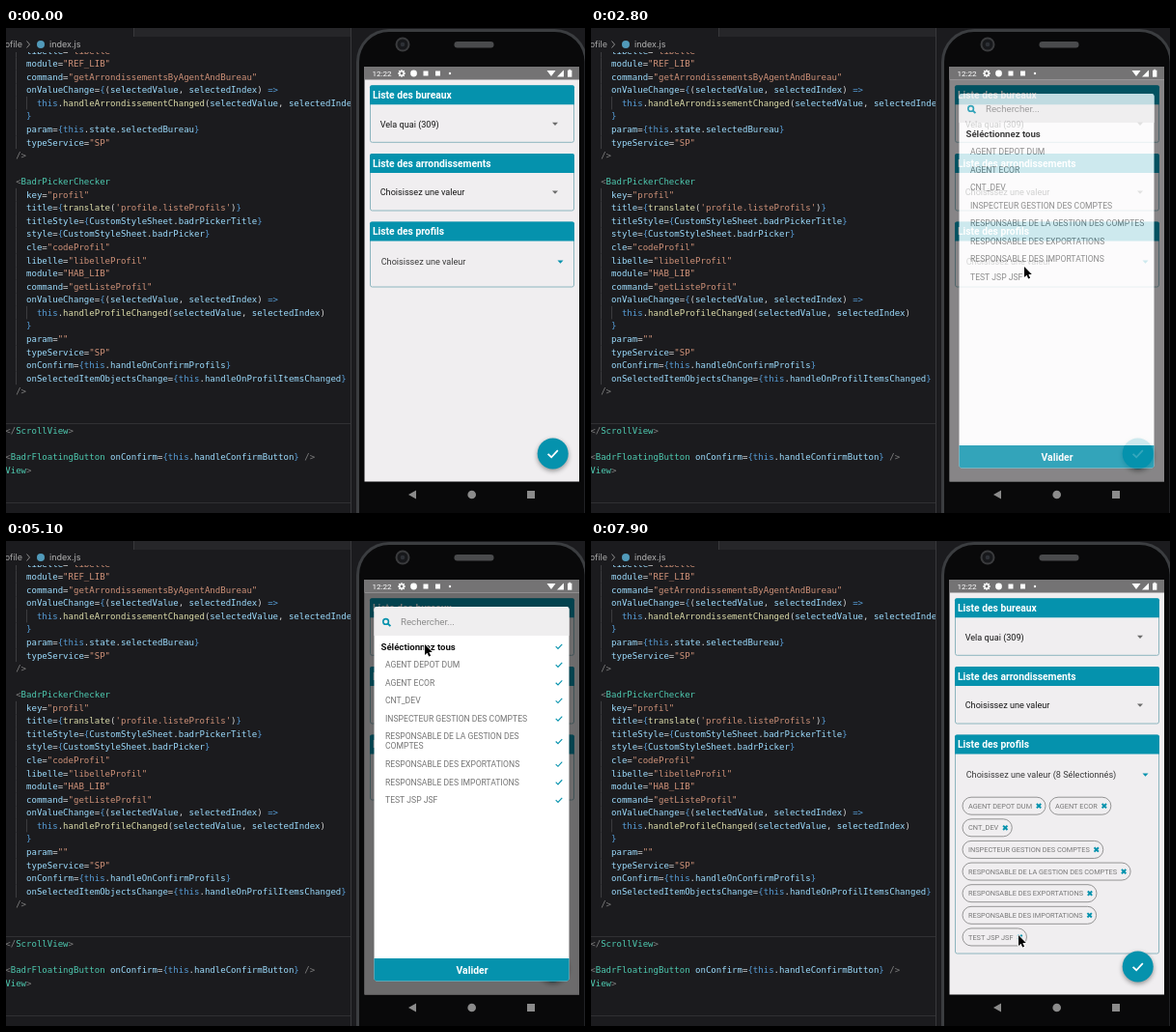
Animation of 600 by 502 pixels, one loop 8 s. Source, as an HTML page with a canvas:

```html
<!DOCTYPE html>
<html lang="fr">
<head>
<meta charset="utf-8">
<title>Profil</title>
<style>
html, body { margin: 0; width: 100%; height: 100%; overflow: hidden; background: #1b1b1e; }
canvas { display: block; width: 600px; height: 502px; }
</style>
</head>
<body>
<canvas id="stage"></canvas>
<script>
const W = 600, H = 502, LOOP = 8000, STEP = 100;
const dpr = window.devicePixelRatio || 1;
const TEAL = '#0592ad', PAPER = '#f0eef0';
const SANS = 'Roboto, sans-serif';
const MONO = '9.04px "DejaVu Sans Mono", monospace';

function makeLayer(canvas) {
  canvas.width = W * dpr;
  canvas.height = H * dpr;
  const c = canvas.getContext('2d');
  c.scale(dpr, dpr);
  return c;
}
const screen = makeLayer(document.getElementById('stage'));
const overlay = makeLayer(document.createElement('canvas'));
let g = screen;

const CODE = `    libelle="libelle"
    module="REF_LIB"
    command="getArrondissementsByAgentAndBureau"
    onValueChange={(selectedValue, selectedIndex) =>
      this.handleArrondissementChanged(selectedValue, selectedIndex)
    }
    param={this.state.selectedBureau}
    typeService="SP"
  />

  <BadrPickerChecker
    key="profil"
    title={translate('profile.listeProfils')}
    titleStyle={CustomStyleSheet.badrPickerTitle}
    style={CustomStyleSheet.badrPicker}
    cle="codeProfil"
    libelle="libelleProfil"
    module="HAB_LIB"
    command="getListeProfil"
    onValueChange={(selectedValue, selectedIndex) =>
      this.handleProfileChanged(selectedValue, selectedIndex)
    }
    param=""
    typeService="SP"
    onConfirm={this.handleOnConfirmProfils}
    onSelectedItemObjectsChange={this.handleOnProfilItemsChanged}
  />


</ScrollView>

<BadrFloatingButton onConfirm={this.handleConfirmButton} />
View>`.split('\n');

const PROFILES = [
  'AGENT DEPOT DUM', 'AGENT ECOR', 'CNT_DEV', 'INSPECTEUR GESTION DES COMPTES',
  'RESPONSABLE DE LA GESTION DES COMPTES', 'RESPONSABLE DES EXPORTATIONS',
  'RESPONSABLE DES IMPORTATIONS', 'TEST JSP JSF'
];

// time, x, y of the pointer tip
const PATH = [
  [100, 470, 504], [900, 449, 249], [1900, 449, 249], [2300, 449, 247],
  [2900, 449, 247], [3500, 458, 212], [3700, 458, 212], [4400, 434, 107],
  [5300, 434, 107], [6100, 456, 440], [6600, 456, 440], [7500, 443, 408]
];

function rect(x, y, w, h, color) {
  g.fillStyle = color;
  g.fillRect(x, y, w, h);
}

function round(x, y, w, h, r, fill, stroke, lw = 1) {
  g.beginPath();
  g.roundRect(x, y, w, h, r);
  if (fill) { g.fillStyle = fill; g.fill(); }
  if (stroke) { g.strokeStyle = stroke; g.lineWidth = lw; g.stroke(); }
}

function disc(x, y, r, color) {
  g.beginPath();
  g.arc(x, y, r, 0, 7);
  g.fillStyle = color;
  g.fill();
}

function ring(x, y, r, color, lw) {
  g.beginPath();
  g.arc(x, y, r, 0, 7);
  g.strokeStyle = color;
  g.lineWidth = lw;
  g.stroke();
}

function poly(color, ...p) {
  g.beginPath();
  for (let i = 0; i < p.length; i += 2) g.lineTo(p[i], p[i + 1]);
  g.closePath();
  g.fillStyle = color;
  g.fill();
}

function line(color, lw, ...p) {
  g.beginPath();
  for (let i = 0; i < p.length; i += 2) g.lineTo(p[i], p[i + 1]);
  g.strokeStyle = color;
  g.lineWidth = lw;
  g.stroke();
}

// y is the middle of the capitals
function text(s, x, y, size, color, weight = 400, align = 'left', family = SANS) {
  g.font = `${weight} ${size}px ${family}`;
  g.textAlign = align;
  g.fillStyle = color;
  g.fillText(s, x, y + size * 0.355);
  return g.measureText(s).width;
}

function tick(x, y, s, color) {
  line(color, s * 0.55, x - 1.65 * s, y + 0.1 * s, x - 0.5 * s, y + 1.2 * s, x + 1.65 * s, y - 1.1 * s);
}

function cross(x, y) {
  line(TEAL, 2, x - 2.2, y - 2.2, x + 2.2, y + 2.2);
  line(TEAL, 2, x - 2.2, y + 2.2, x + 2.2, y - 2.2);
}

function tokenColor(tok, before, after) {
  if (/^["']/.test(tok)) return '#ce9178';
  if (/^(this|=>|[{}])$/.test(tok)) return '#569cd6';
  if (/^(<\/?|\/?>)$/.test(tok)) return '#808080';
  if (/^\w/.test(tok)) {
    if (/<\/?$/.test(before) || after[0] === '>') return '#4ec9b0';
    return after[0] === '(' ? '#dcdcaa' : '#9cdcfe';
  }
  return '#d4d4d4';
}

function codeLine(src, x, y, cw) {
  for (const m of src.matchAll(/"[^"]*"|'[^']*'|=>|<\/?|\/?>|\w+|[^\s\w]/g)) {
    g.fillStyle = tokenColor(m[0], src.slice(0, m.index), src.slice(m.index + m[0].length));
    g.fillText(m[0], x + m.index * cw, y);
  }
}

function editor() {
  rect(0, 0, W, H, '#1b1b1e');
  g.save();
  g.beginPath();
  g.rect(0, 0, 358, H);
  g.clip();
  rect(0, 409, 358, 1, '#303033');
  rect(0, 491, 358, 1, '#303033');
  g.font = MONO;
  g.textAlign = 'left';
  const cw = g.measureText('m').width;
  CODE.forEach((src, i) => {
    const mid = 23.45 + i * 13.56;
    const indent = src.search(/\S/);
    if (indent >= 4) rect(10, mid - 6.8, 1, 13.56, '#3c3c3f');
    if (indent >= 6) rect(21, mid - 6.8, 1, 13.56, '#3c3c3f');
    codeLine(src, -0.7, mid + 3.2, cw);
  });
  rect(0, 0, 358, 25, '#1b1b1e');
  rect(133, 0, 225, 9, '#262629');
  rect(132, 0, 1, 9, '#38383b');
  text('profile', 17, 17, 9, '#a5a5a5', 400, 'right', 'Inter, sans-serif');
  line('#8c8c8c', 1, 21.5, 13.5, 24.5, 17, 21.5, 20.5);
  disc(36, 17, 4, '#519aba');
  text('index.js', 45, 17, 9, '#b4b4b4', 400, 'left', 'Inter, sans-serif');
  g.restore();
  rect(357, 0, 1, H, '#38383b');
}

function phone() {
  round(363, 1, 239.5, 560, 34, '#3b3d40');
  round(366, 4, 233.5, 560, 31, '#09090a');
  round(464.5, 14, 41, 6.5, 3.2, '#4a4b4d');
  disc(411, 17, 7.5, '#3a3b3d');
  disc(411, 17, 5.5, '#17181b');
  disc(411, 17, 2.3, '#2d3036');
  rect(371.5, 40, 222.5, 429.5, PAPER);
  poly('#8b8b8b', 417, 483, 425, 478.5, 425, 487.5);
  disc(482.7, 483, 4.3, '#8b8b8b');
  rect(540, 479, 8, 8, '#8b8b8b');
}

function statusBar() {
  rect(371.5, 40, 222.5, 13.5, '#747374');
  text('12:22', 379.5, 47, 8.1, '#fff');
  for (let i = 0; i < 8; i++) {
    const a = i * Math.PI / 4;
    line('#fff', 1.5, 410 + 2 * Math.cos(a), 47 + 2 * Math.sin(a), 410 + 3.8 * Math.cos(a), 47 + 3.8 * Math.sin(a));
  }
  ring(410, 47, 2.1, '#fff', 1.4);
  disc(422.5, 47, 3.4, '#fff');
  rect(432.5, 44.5, 5, 5, '#fff');
  rect(445, 44.5, 5, 5, '#fff');
  disc(460, 47, 1.2, '#fff');
  poly('#fff', 560.5, 44, 569.5, 44, 565, 50);
  poly('#fff', 571, 50.5, 578, 50.5, 578, 43.5);
  rect(582, 43.7, 4.4, 7, '#fff');
  rect(583.3, 42.8, 1.8, 1, '#fff');
}

function card(title, y, h, value, color) {
  round(377.5, y + 0.5, 211, h - 1, 2, PAPER, '#8db5bf');
  round(377, y, 212, 20, [2, 2, 0, 0], TEAL);
  text(title, 380, y + 10.3, 10.3, '#fff', 700);
  const third = color === TEAL;
  const cy = y + (third ? 41.5 : 40);
  text(value, third ? 388.7 : 387.7, cy, 9.1, third ? '#3a3a3a' : '#161616');
  const ax = third ? 574.5 : 569;
  poly(color, ax - 3, cy - 1.5, ax + 3, cy - 1.5, ax, cy + 1.7);
}

function chip(label, x, y) {
  const w = text(label, x + 6, y, 7.35, '#777');
  round(x, y - 9, w + 20, 18, 9, null, '#8b8b8b', 0.9);
  cross(x + w + 13, y);
  return w + 20;
}

function form(done) {
  card('Liste des bureaux', 59.3, 59.5, 'Vela quai (309)', '#6b6b6b');
  card('Liste des arrondissements', 130, 59.5, 'Choisissez une valeur', '#6b6b6b');
  const value = 'Choisissez une valeur' + (done ? ' (8 Sélectionnés)' : '');
  card('Liste des profils', 200.5, done ? 227 : 68, value, TEAL);
  if (done) {
    const w = chip(PROFILES[0], 385, 274.2);
    chip(PROFILES[1], 385 + w + 4, 274.2);
    PROFILES.slice(2).forEach((p, i) => chip(p, 385, 296.8 + i * 22.63));
  }
  g.save();
  g.shadowColor = 'rgba(0,0,0,.4)';
  g.shadowBlur = 5 * dpr;
  g.shadowOffsetY = 2 * dpr;
  disc(566.7, 440.5, 16, TEAL);
  g.restore();
  tick(566.7, 440.5, 3.1, '#fff');
}

function dialog(picked) {
  g.clearRect(0, 0, W, H);
  rect(371.5, 53.5, 222.5, 416, 'rgba(0,0,0,.55)');
  round(381.5, 68, 202, 387.5, 3, '#fff');
  round(381.5, 68, 202, 30, [3, 3, 0, 0], '#efeeef');
  ring(393.6, 83.4, 2.8, TEAL, 1.6);
  line(TEAL, 1.9, 395.6, 85.4, 398.4, 88.2);
  text('Rechercher...', 409, 84, 9.7, '#8a8a8a');
  text('Séléctionnez tous', 388.5, 109.3, 9.65, '#111', 700);
  if (picked) tick(573, 109, 2, TEAL);
  let y = 128;
  PROFILES.forEach((p, i) => {
    const wrap = picked && i === 4;
    if (wrap) {
      const cut = p.lastIndexOf(' ');
      text(p.slice(0, cut), 393, y, 8.6, '#757575');
      text(p.slice(cut + 1), 393, y + 10, 8.6, '#757575');
    } else {
      text(p, 393, y, 8.6, '#757575');
    }
    if (picked) tick(573, y + (wrap ? 5 : 0), 2, TEAL);
    y += wrap ? 28.6 : 18.57;
  });
  round(381.5, 432, 202, 23.5, [0, 0, 3, 3], TEAL);
  text('Valider', 483, 444, 10.4, '#fff', 700, 'center');
}

function pointer(t) {
  if (t <= PATH[0][0]) return;
  let [, x, y] = PATH[PATH.length - 1];
  const i = PATH.findIndex(p => p[0] >= t);
  if (i > 0) {
    const [t0, x0, y0] = PATH[i - 1], [t1, x1, y1] = PATH[i];
    const k = (t - t0) / (t1 - t0), e = k * k * (3 - 2 * k);
    x = x0 + (x1 - x0) * e;
    y = y0 + (y1 - y0) * e;
  }
  g.save();
  g.translate(x, y);
  g.beginPath();
  for (const [px, py] of [[0, 0], [0, 11], [2.5, 8.7], [4.2, 12.6], [6.1, 11.8], [4.4, 8], [7.8, 8]]) g.lineTo(px, py);
  g.closePath();
  g.lineJoin = 'round';
  g.strokeStyle = '#fff';
  g.lineWidth = 1.6;
  g.stroke();
  g.fillStyle = '#000';
  g.fill();
  g.restore();
}

const clamp = v => Math.min(1, Math.max(0, v));

function draw(now) {
  const t = Math.floor((now % LOOP) / STEP) * STEP;
  const shown = clamp((t - 2640) / 200) * clamp((6518 - t) / 160);
  g = screen;
  editor();
  phone();
  form(t >= 6400);
  if (shown > 0) {
    g = overlay;
    dialog(t >= 4600);
    g = screen;
    g.globalAlpha = shown;
    g.drawImage(overlay.canvas, 0, 0, W, H);
    g.globalAlpha = 1;
  }
  statusBar();
  pointer(t);
}

const start = performance.now();
function loop() {
  draw(performance.now() - start);
  requestAnimationFrame(loop);
}
loop();
</script>
</body>
</html>
```
